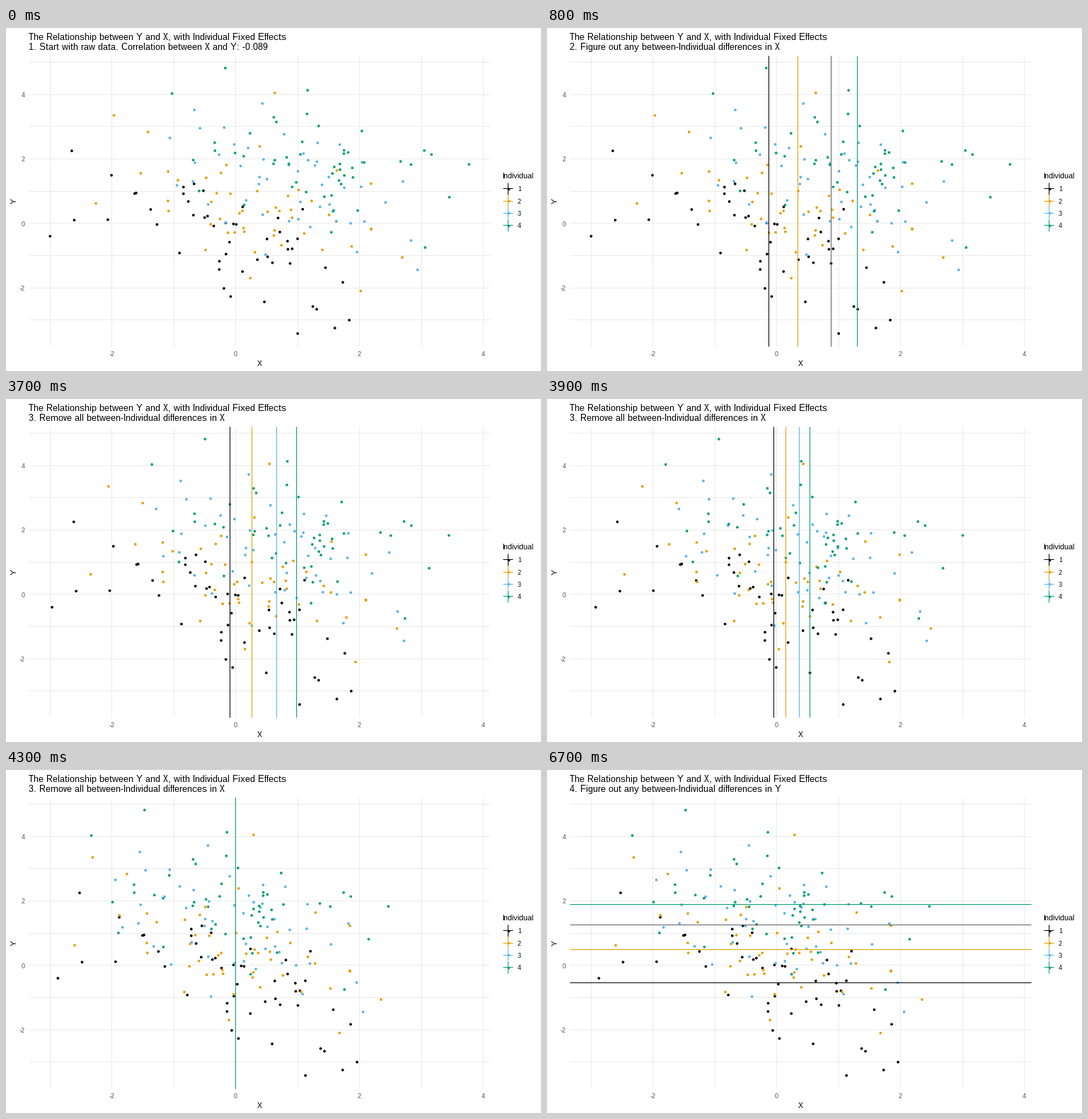
A matplotlib script that plays this animation: 756 by 486 pixels, repeating every 8000 ms.

```python
import numpy as np
import matplotlib.pyplot as plt
from matplotlib.animation import FuncAnimation

WIDTH, HEIGHT, DPI = 756, 486, 72
STEP_MS, LOOP_MS = 100, 8000
LEFT, RIGHT, TOP, BOTTOM = 32, 684, 39, 451
COLORS = ["#000000", "#E69F00", "#56B4E9", "#009E73"]
RESTING_COLORS = ["#000000", "#E69F00", "#606060", "#009E73"]
GRID, TICK = "#EBEBEB", "#4D4D4D"
GROUP_SIZE = 50
SLOPE, SPREAD_X, SPREAD_Y = -0.6, 0.95, 0.9

MEAN_X = np.array([-0.126, 0.343, 0.88, 1.304])
MEAN_Y = np.array([-0.54, 0.49, 1.255, 1.89])

CAPTIONS = [
    (0, "1. Start with raw data. Correlation between X and Y: -0.089"),
    (500, "2. Figure out any between-Individual differences in X"),
    (3500, "3. Remove all between-Individual differences in X"),
    (6400, "4. Figure out any between-Individual differences in Y"),
]

# The extreme observations of each individual; the rest follow a linear model.
EXTREMES = [
    [(-3, -0.4), (-2.65, 2.25), (-2.61, 0.1), (1, -3.42), (1.73, -1.83)],
    [(-1.97, 3.35), (0.63, 4.05), (-2.26, 0.62), (2.02, -2.1), (2.69, -1.06)],
    [(-0.67, 3.52), (0.43, 3.72), (-0.95, 1.18), (2.7, 1.3), (0.48, -0.97)],
    [(-0.17, 4.82), (-1.03, 4.03), (1.16, 4.13), (3.77, 1.83), (3.06, -0.75)],
]

rng = np.random.default_rng(11)


def noise(n):
    z = np.clip(rng.normal(size=n), -1.9, 1.9)
    return (z - z.mean()) / z.std()


def observations(extremes, mean):
    """Extremes plus model draws, centred so the group keeps its mean."""
    n = GROUP_SIZE - len(extremes)
    dx = SPREAD_X * noise(n)
    dy = SLOPE * dx + SPREAD_Y * noise(n)
    center = (GROUP_SIZE * np.array(mean) - np.sum(extremes, axis=0)) / n
    return np.vstack([extremes, center + np.column_stack([dx, dy])])


def px(x):
    return 324.2 + 87.45 * x


def py(y):
    return 276.3 - 45.65 * y


data = np.vstack([observations(e, m) for e, m in zip(EXTREMES, zip(MEAN_X, MEAN_Y))])
owner = np.repeat(np.arange(4), GROUP_SIZE)

# Fully hinted glyphs give crisp, whole-pixel letter spacing.
plt.rcParams.update({"font.family": "Liberation Sans", "text.hinting": "native",
                     "text.hinting_factor": 1})
fig = plt.figure(figsize=(WIDTH / DPI, HEIGHT / DPI), dpi=DPI, facecolor="white")
ax = fig.add_axes([0, 0, 1, 1])
ax.set(xlim=(0, WIDTH), ylim=(HEIGHT, 0))
ax.axis("off")


def segment(xs, ys, color, zorder):
    return ax.plot(xs, ys, color=color, lw=1, zorder=zorder, snap=True,
                   solid_capstyle="butt")[0]


def v_segment(x, color, zorder):
    return segment([x, x], [TOP, BOTTOM], color, zorder)


def h_segment(y, color, zorder):
    return segment([LEFT, RIGHT], [y, y], color, zorder)


def label(x, baseline, text, size, color="black", ha="left"):
    return ax.text(x, baseline, text, size=size, color=color, ha=ha, va="baseline")


for x in range(-3, 5):
    v_segment(px(x), GRID, 1)
for y in range(-3, 6):
    h_segment(py(y), GRID, 1)
for v in (-2, 0, 2, 4):
    label(px(v), 465, str(v), 9, TICK, "center")
    label(27, py(v) + 4.3, str(v), 9, TICK, "right")

label(32, 17, "The Relationship between Y and X, with Individual Fixed Effects", 13)
caption = label(32, 31, "", 13)
label(358, 479, "X", 11, ha="center")
ax.text(11.5, 245, "Y", size=11, rotation=90, ha="center", va="center")

label(701, 213, "Individual", 11)
for i, color in enumerate(COLORS):
    y = 227.3 + 17.28 * i
    segment([702, 716], [y, y], color, 2)
    segment([709, 709], [y - 8.5, y + 8.5], color, 2)
    ax.scatter(709.5, y + 0.5, s=13, c=color, lw=0, zorder=3)
    label(723, y + 4, str(i + 1), 9)

dots = ax.scatter([], [], s=14, lw=0, zorder=3)
dots.set_facecolor([COLORS[i] for i in owner])
v_lines = [v_segment(px(x), c, 4) for x, c in zip(MEAN_X, COLORS)]
h_lines = [h_segment(py(y), c, 4) for y, c in zip(MEAN_Y, RESTING_COLORS)]


def update(frame):
    ms = frame * STEP_MS
    caption.set_text([text for start, text in CAPTIONS if ms >= start][-1])

    t = np.clip((ms - 3400) / 900, 0, 1)
    removed = MEAN_X * (1 - np.cos(np.pi * t)) / 2
    xs, ys = data.T
    dots.set_offsets(np.column_stack([px(xs - removed[owner]), py(ys)]) + 0.5)

    colors = COLORS if t > 0 else RESTING_COLORS
    for line, x, color in zip(v_lines, px(MEAN_X - removed), colors):
        line.set_xdata([x, x])
        line.set_color(color)
        line.set_visible(800 <= ms < 6400)
    for line in h_lines:
        line.set_visible(ms >= 6700)
    return [caption, dots, *v_lines, *h_lines]


anim = FuncAnimation(fig, update, frames=LOOP_MS // STEP_MS, interval=STEP_MS,
                     repeat=True, repeat_delay=0)
plt.show()
```
